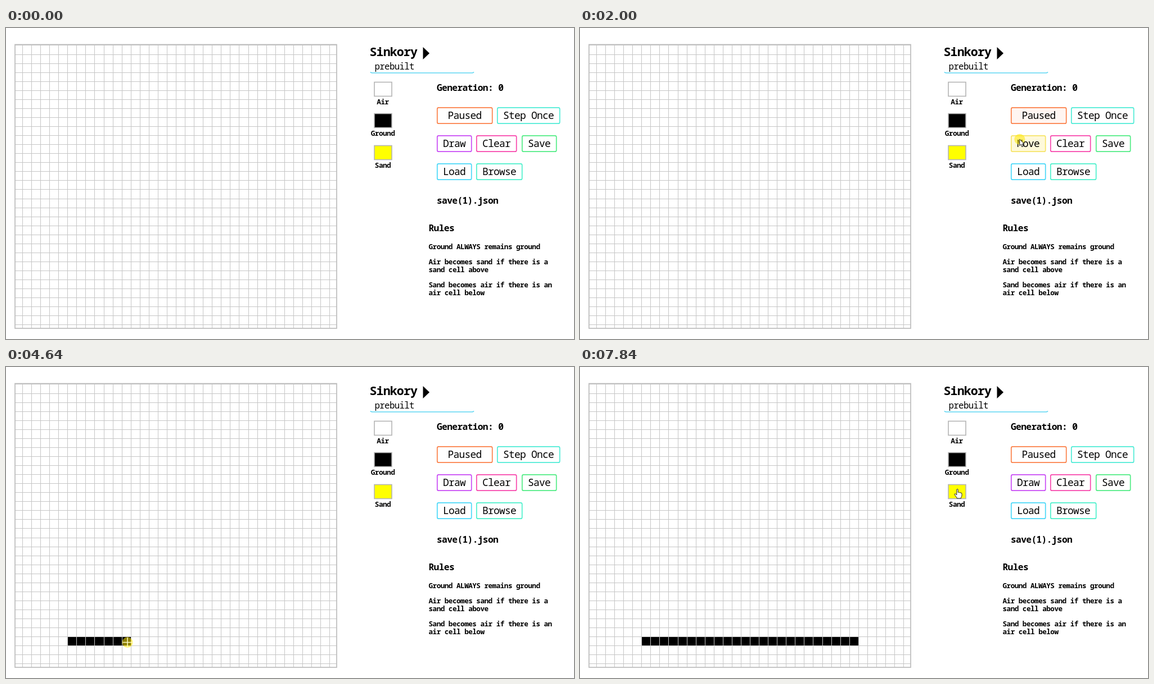
Write an HTML page that moves like this. It is 1010x554 px and loops after 8 s.

```html
<!DOCTYPE html>
<html lang="en">
<head>
<meta charset="utf-8">
<title>Falling sand</title>
<style>
html, body { margin: 0; width: 100%; height: 100%; overflow: hidden; background: #fff; }
svg { display: block; }
text { font-family: "Noto Sans Mono", "DejaVu Sans Mono", monospace; white-space: pre; }
</style>
</head>
<body>
<svg id="stage" width="1010" height="554" viewBox="0 0 1010 554"></svg>
<script>
const stage = document.getElementById('stage');
const LOOP = 8000;

function add(tag, attrs, parent = stage) {
  const el = document.createElementNS('http://www.w3.org/2000/svg', tag);
  for (const k in attrs) el.setAttribute(k, attrs[k]);
  parent.append(el);
  return el;
}

// Monospaced text with a given advance per character
function label(str, x, y, advance, weight = 700, anchor = 'start') {
  const size = advance / 0.6 * 1.07;
  const el = add('text', {
    x, y, 'font-size': size, 'letter-spacing': advance - size * 0.6,
    'font-weight': weight, 'text-anchor': anchor
  });
  el.textContent = str;
  return el;
}

// Board
const CELL = 16.0625, BAR_X = 110;
const bar = add('rect', { x: BAR_X, y: 481, width: 0, height: 16 });
const line = (origin, i) => Math.floor(origin + i * CELL) + 0.5;
let lines = '';
for (let i = 0; i < 35; i++) lines += `M${line(29.44, i)} 30V535`;
for (let i = 0; i < 32; i++) lines += `M16 ${line(30.94, i)}H588`;
add('path', { d: lines, stroke: '#c6c6c6', fill: 'none' });
add('rect', { x: 16, y: 29.5, width: 572, height: 505.5, fill: 'none', stroke: '#bdbdbd', 'stroke-width': 1.7 });

// Side panel
label('Sinkory', 646.5, 50, 12.1);
add('path', { d: 'M741.5 34L753 45L741.5 56Z' });
label('prebuilt', 655.5, 73.5, 8.8, 500);
add('path', { d: 'M648 78.6Q649 80 651 80H829Q831 80 832 78.6', fill: 'none', stroke: '#5cd6f3', 'stroke-width': 1.7 });

[['Air', '#fff'], ['Ground', '#000'], ['Sand', '#ff0']].forEach(([name, fill], i) => {
  const y = Math.floor(96 + i * 56.5);
  add('rect', { x: 655, y: y + 0.5, width: 31, height: 25, fill, stroke: '#b4b4b4', 'stroke-width': 1.6 });
  label(name, 670, y + 40, 7.1, 700, 'middle');
});

label('Generation: 0', 766, 112, 9.1);
label('save(1).json', 766, 313, 9.1);
label('Rules', 751.5, 362, 9.1);
[
  ['Ground ALWAYS remains ground', 394],
  ['Air becomes sand if there is a', 421],
  ['sand cell above', 435],
  ['Sand becomes air if there is an', 462],
  ['air cell below', 476]
].forEach(([str, y]) => label(str, 751.5, y, 7.08));

function button(str, x, y, width, color) {
  const box = add('rect', {
    x: x + 0.8, y: y + 0.8, width: width - 1.1, height: 28.4, rx: 2.5,
    fill: '#fff', stroke: color, 'stroke-width': 1.7
  });
  const text = label(str, x + (width - str.length * 10) / 2, y + 21, 10, 500);
  const inside = (px, py) => px > x && px < x + width && py > y && py < y + 30;
  return { box, text, inside };
}
const PURPLE = '#c84af5', YELLOW = '#f6e468';
const paused = button('Paused', 766, 141, 99, '#fb8048');
button('Step Once', 873, 141, 112, '#4eecd6');
const mode = button('Draw', 766, 191, 62, PURPLE);
const clear = button('Clear', 836, 191, 72, '#f746ac');
button('Save', 917, 191, 62, '#50ec84');
button('Load', 766, 241, 62, '#4ad8f8');
button('Browse', 836, 241, 82, '#4cf0cc');

// Pointer
const pointer = add('g', {});
const ring = add('circle', { r: 9.5, fill: '#ffe800', 'fill-opacity': 0.55 }, pointer);
const outline = { fill: '#fff', stroke: '#222', 'stroke-width': 1, 'stroke-linejoin': 'round' };
const shapes = {
  arrow: add('path', { d: 'M0 0V11.5L2.7 9L4.6 13.2L6.5 12.4L4.7 8.3H8Z', ...outline }, pointer),
  hand: add('path', {
    d: 'M-1.2 1.2Q0-.5 1.2 1.2V6.5Q2.5 5.4 3.6 6.8Q5 6 6 7.3Q8 6.8 8 9V12Q8 14 6.5 15.5V17H-1V15.5L-5 10.5Q-5.5 8.5-3.5 9L-1.2 11Z',
    ...outline
  }, pointer),
  move: add('path', {
    d: 'M0-8V8M-8 0H8M-2.5-5.5L0-8L2.5-5.5M-2.5 5.5L0 8L2.5 5.5M-5.5-2.5L-8 0L-5.5 2.5M5.5-2.5L8 0L5.5 2.5',
    fill: 'none', stroke: '#000', 'stroke-width': 1.4
  }, pointer),
  cross: add('path', { d: 'M0-8.5V8.5M-8.5 0H8.5', fill: 'none', stroke: '#000', 'stroke-width': 1.5 }, pointer)
};

// Turning points of the pointer: time, x, y
const path = [
  [140, 904, 435], [640, 800, 204], [990, 797, 202], [1140, 772, 160], [1450, 308, 469],
  [1620, 423, 446], [1900, 766, 160], [1960, 782, 198], [2610, 779, 201], [2930, 671, 166],
  [3090, 671, 166], [3540, 172, 476], [3710, 112, 497], [4150, 113, 491], [5467, 403, 490],
  [6160, 485, 489], [6400, 483, 488], [6820, 850, 231], [6930, 842, 206], [7240, 672, 164],
  [7380, 671, 213], [7720, 671, 217]
];
function position(t) {
  const i = path.findIndex(p => p[0] > t);
  if (i < 1) return path.at(i).slice(1);
  const [t0, x0, y0] = path[i - 1], [t1, x1, y1] = path[i];
  const u = (t - t0) / (t1 - t0);
  return [x0 + (x1 - x0) * u, y0 + (y1 - y0) * u];
}

const START = 140, STEP = 77.2, DRAG = 4150, RELEASE = 6300;
const snap = t => START + Math.floor((t - START + 15) / STEP) * STEP;
const clicks = [[680, 830], [1990, 2060], [2990, 3070], [DRAG, RELEASE]];
const isMove = t => t >= 830 && t < 2060;

// A fill fades over FADE ms: average the hover colour over that span
const FADE = 180, SAMPLES = 12, WHITE = [255, 255, 255];
function fill(btn, t, hover) {
  const sum = [0, 0, 0];
  for (let i = 0; i < SAMPLES; i++) {
    const past = t - i * FADE / SAMPLES;
    const color = btn.inside(...position(past)) ? hover(past) : WHITE;
    color.forEach((c, j) => sum[j] += c / SAMPLES);
  }
  btn.box.setAttribute('fill', `rgb(${sum.map(Math.round)})`);
}

function draw(now) {
  const t = snap(now % LOOP);
  const [x, y] = position(t);
  const moving = isMove(t);

  fill(mode, t, past => isMove(past) ? [249, 230, 105] : [216, 102, 250]);
  fill(paused, t, () => [252, 140, 90]);
  fill(clear, t, () => [248, 90, 180]);
  mode.text.textContent = moving ? 'Move' : 'Draw';
  mode.box.setAttribute('stroke', moving ? YELLOW : PURPLE);

  const [tip] = position(Math.min(t, RELEASE));
  const cells = t < DRAG ? 0 : Math.floor((tip - BAR_X) / CELL) + 1;
  bar.setAttribute('width', cells * CELL);

  const onSwatch = x > 654 && x < 688 && y > 151 && y < 236;
  const kind = x < 588 ? (moving ? 'move' : 'cross') : onSwatch ? 'hand' : 'arrow';
  for (const k in shapes) shapes[k].style.display = k === kind ? '' : 'none';
  shapes.cross.setAttribute('stroke', t >= DRAG ? '#fffbc8' : '#000');
  ring.style.display = clicks.some(([a, b]) => t >= a && t < b) && !moving | t > 1900 ? '' : 'none';
  pointer.style.display = t < START ? 'none' : '';
  pointer.setAttribute('transform', `translate(${x.toFixed(1)} ${y.toFixed(1)})`);
}

const start = performance.now();
function tick() {
  draw(performance.now() - start);
  requestAnimationFrame(tick);
}
tick();
</script>
</body>
</html>
```
